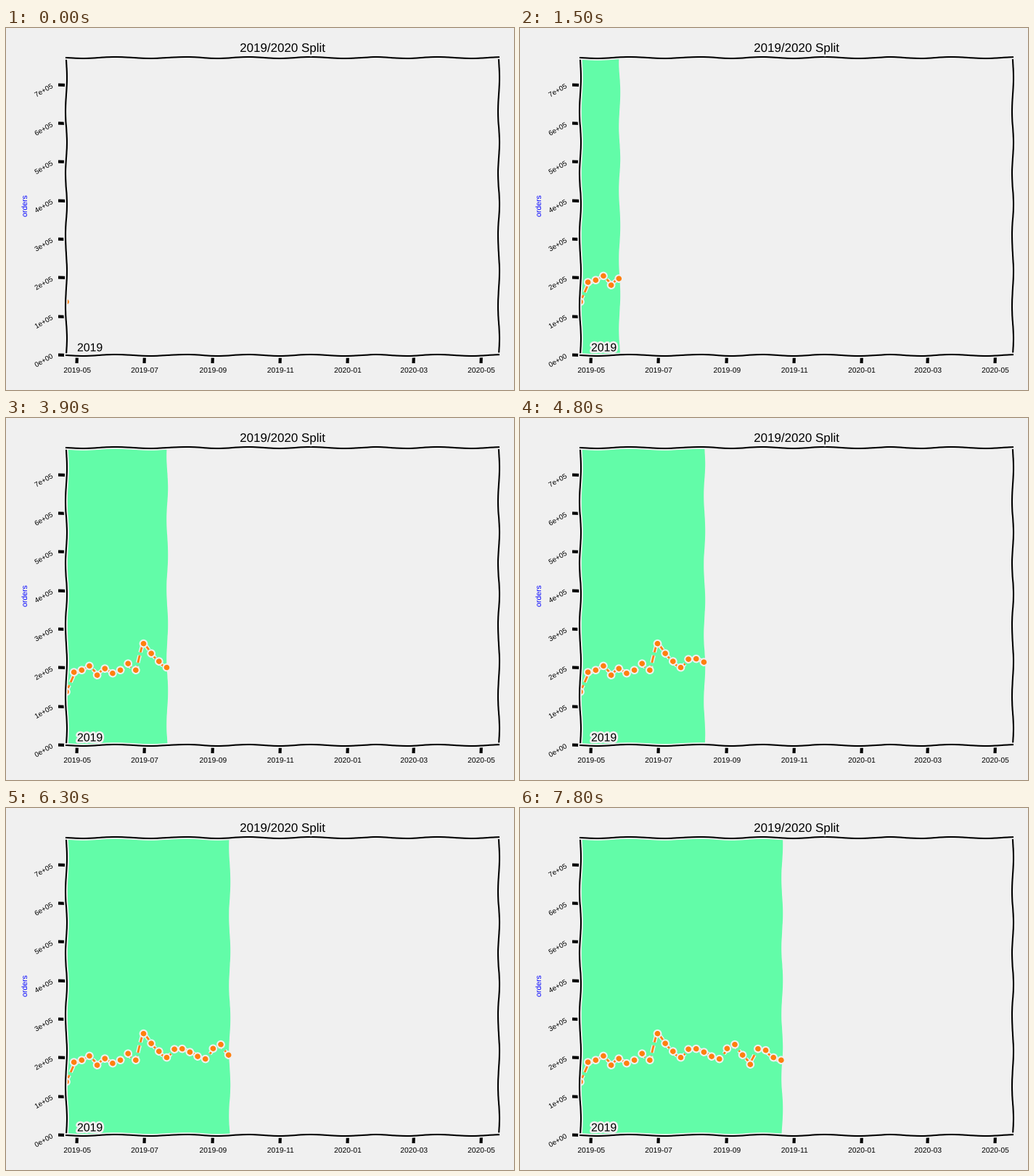
These frames come from a looping animation (700 px wide and 500 px high, 8000 ms). A matplotlib script:

```python
import matplotlib.pyplot as plt
import numpy as np
from matplotlib.animation import FuncAnimation
from matplotlib.patheffects import withStroke

WIDTH, HEIGHT, DPI = 700, 500, 100
LEFT, RIGHT, TOP, BOTTOM = 83, 679.4, 41, 451.85
BACKGROUND, GREEN, ORANGE = "#f0f0f0", "#62fca8", "#ff7f0e"
TICK_MS, TICKS_PER_WEEK, TICKS = 100, 3, 80

START = np.datetime64("2019-04-21")
TOTAL_DAYS = 56 * 7
ORDERS = 1000 * np.array([
    137.9, 188.6, 194, 204.9, 181, 198, 185.7, 194, 211, 194, 262.7, 237.3,
    216.7, 200.8, 222.3, 223.3, 214.8, 203.6, 197, 224, 234.5, 207.3, 182.9,
    223.3, 219.5, 200.8, 194])
MAX_ORDERS = 7.71e5

fig = plt.figure(figsize=(WIDTH / DPI, HEIGHT / DPI), dpi=DPI, facecolor=BACKGROUND)

# Hand-drawn look for everything created from here on.
plt.rcParams.update({
    "font.family": "Liberation Sans",
    "path.sketch": (1, 100, 2),
    "path.effects": [withStroke(linewidth=4, foreground=BACKGROUND)],
    "axes.linewidth": 1.5,
    "xtick.major.size": 8, "xtick.major.width": 3,
    "ytick.major.size": 8, "ytick.major.width": 3,
})

ax = fig.add_axes([LEFT / WIDTH, 1 - BOTTOM / HEIGHT,
                   (RIGHT - LEFT) / WIDTH, (BOTTOM - TOP) / HEIGHT])
ax.patch.set_visible(False)
ax.set(xlim=(0, TOTAL_DAYS), ylim=(0, MAX_ORDERS))


def label(x, y, text, size, ha="center", va="baseline", **style):
    """Place text at pixel coordinates measured from the top left."""
    ax.text(x / WIDTH, 1 - y / HEIGHT, text, fontsize=size, ha=ha, va=va,
            transform=fig.transFigure, **style)


months = [f"2019-{m:02d}" for m in (5, 7, 9, 11)] + [f"2020-{m:02d}" for m in (1, 3, 5)]
month_days = [int((np.datetime64(f"{m}-01") - START).astype(int)) for m in months]
ax.set_xticks(month_days, labels=[])
for month, day in zip(months, month_days):
    label(LEFT + day / TOTAL_DAYS * (RIGHT - LEFT), 476, month, 7.4)

levels = np.arange(8) * 1e5
ax.set_yticks(levels, labels=[])
for level in levels:
    y = BOTTOM - level / MAX_ORDERS * (BOTTOM - TOP)
    label(52, y + 7.5, f"{level:.0e}", 7, va="center", rotation=30)

label(381, 33, "2019/2020 Split", 12.2)
label(26, 246, "orders", 7.6, va="center", rotation=90, color="blue")
label(98, 446.5, "2019", 11.4, ha="left")

span, = ax.fill([0, 0, 0, 0], [0, MAX_ORDERS, MAX_ORDERS, 0], color=GREEN, zorder=1)
line, = ax.plot([], [], "--o", color=ORANGE, linewidth=2, markersize=4)


def update(tick):
    week = tick // TICKS_PER_WEEK
    days = 7 * np.arange(week + 1)
    end = days[-1]
    span.set_xy([(0, 0), (0, MAX_ORDERS), (end, MAX_ORDERS), (end, 0)])
    line.set_data(days, ORDERS[:week + 1])
    return span, line


anim = FuncAnimation(fig, update, frames=TICKS, interval=TICK_MS,
                     repeat=True, repeat_delay=0, blit=False)
plt.show()
```
